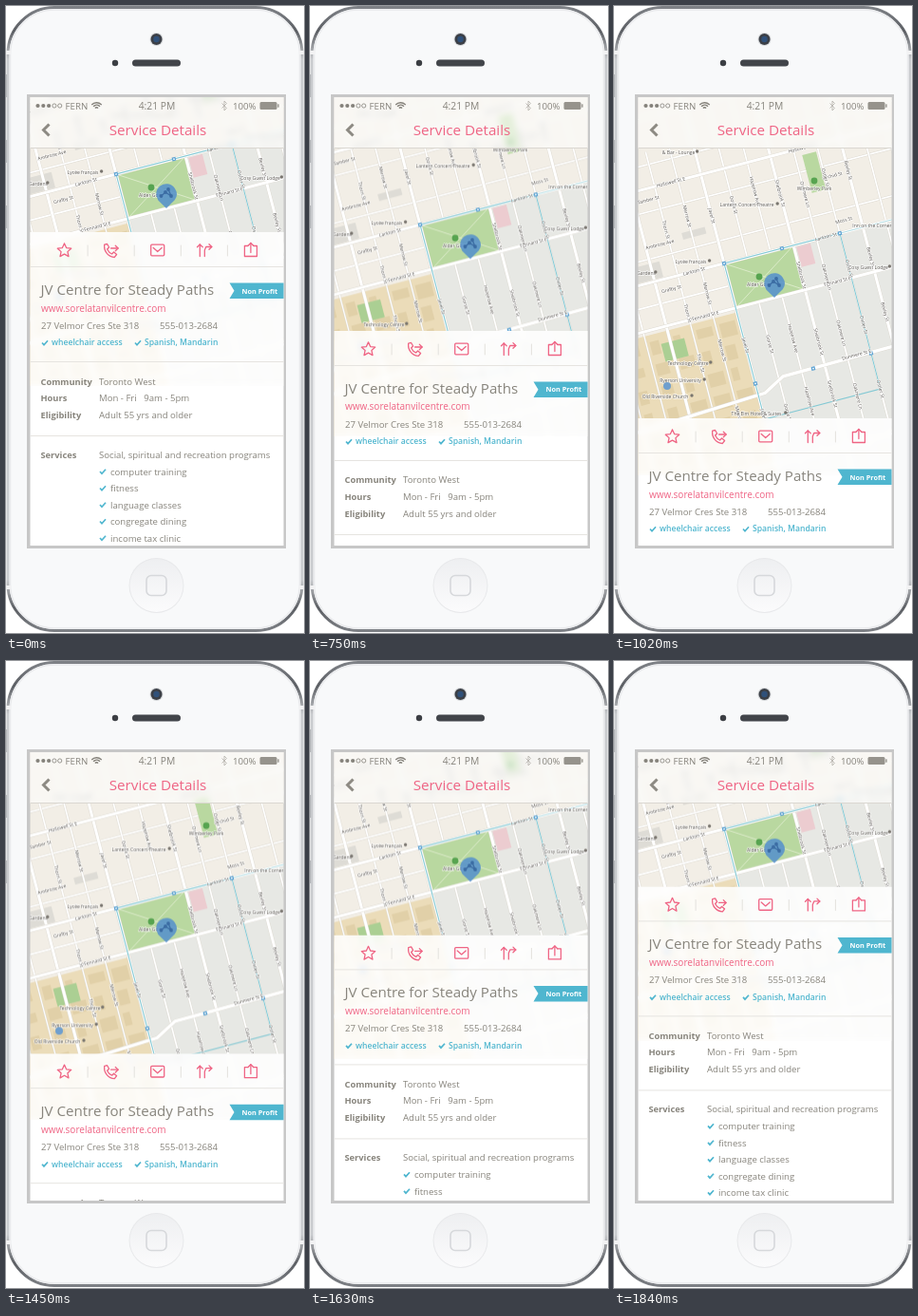
Recreate the animation shown at these times as an HTML page with a canvas. Size 314 by 660 pixels, loop 1.91 s.

```html
<!DOCTYPE html>
<html lang="en">
<head>
<meta charset="utf-8">
<title>Service details</title>
<style>
html, body { margin: 0; width: 100%; height: 100%; overflow: hidden; background: #fff; }
canvas { display: block; width: 314px; height: 660px; }
</style>
</head>
<body>
<canvas id="stage"></canvas>
<script>
const W = 314, H = 660, LOOP = 1910, STEP = 30, OPEN_AT = 630, CLOSE_AT = 1450;
const PINK = '#ef6484', BLUE = '#4fb6cf', GREY = '#87847c';
const FONT = '"Open Sans", "Noto Sans", sans-serif';
const PANEL_TRAVEL = 196, MAP_TRAVEL = 94, MAP_TOP = 60, MAP_H = 434;
const dpr = window.devicePixelRatio || 1;

function prepare(canvas, height) {
  canvas.width = W * dpr;
  canvas.height = height * dpr;
  const g = canvas.getContext('2d');
  g.scale(dpr, dpr);
  return g;
}

const ctx = prepare(document.getElementById('stage'), H);

function seeded(seed) {
  return () => (seed = seed * 16807 % 2147483647) / 2147483647;
}
function path(g, pts) {
  g.beginPath();
  pts.forEach(([x, y], i) => i ? g.lineTo(x, y) : g.moveTo(x, y));
}
function line(g, color, width, pts) {
  path(g, pts);
  g.strokeStyle = color;
  g.lineWidth = width;
  g.stroke();
}
function disc(g, color, x, y, r) {
  g.beginPath();
  g.arc(x, y, r, 0, Math.PI * 2);
  g.fillStyle = color;
  g.fill();
}
function pill(fill, x, y, w, h, r, stroke, width) {
  ctx.beginPath();
  ctx.roundRect(x, y, w, h, r);
  if (fill) {
    ctx.fillStyle = fill;
    ctx.fill();
  }
  if (stroke) {
    ctx.strokeStyle = stroke;
    ctx.lineWidth = width;
    ctx.stroke();
  }
}
function text(g, str, x, y, size, color, weight = 400, align = 'left') {
  g.font = `${weight} ${size}px ${FONT}`;
  g.textAlign = align;
  g.fillStyle = color;
  g.fillText(str, x, y);
}

// The town is a square grid of streets (u) and avenues (v), turned about one corner of the park.
const TILT = -0.255, CELL_U = 25.2, CELL_V = 24.2, CORNER = [116, 271];

function paintMap(g) {
  const random = seeded(11);
  const at = (u, v) => [u * CELL_U, v * CELL_V];
  const block = (color, u, v, w, h) => {
    g.fillStyle = color;
    g.fillRect(...at(u, v), w * CELL_U, h * CELL_V);
  };
  const road = (width, ...stops) => {
    const pts = stops.map(([u, v]) => at(u, v));
    line(g, '#dcd8cf', width + 0.8, pts);
    line(g, '#fff', width, pts);
  };
  const label = (str, x, y, angle = 0) => {
    g.save();
    g.translate(x, y);
    g.rotate(angle);
    g.lineJoin = 'round';
    g.font = `500 5px ${FONT}`;
    g.textAlign = 'center';
    g.strokeStyle = 'rgba(255,255,255,.8)';
    g.lineWidth = 1.4;
    g.strokeText(str, 0, 1.6);
    text(g, str, 0, 1.6, 5, '#57534e', 500, 'center');
    g.restore();
  };

  g.translate(0, -MAP_TOP);
  g.fillStyle = '#f2eee6';
  g.fillRect(0, MAP_TOP, W, MAP_H);

  g.save();
  g.translate(...CORNER);
  g.rotate(TILT);
  block('#e7e8e4', 0, 0, 9, 14);
  block('#dedcd6', -3.9, -0.8, 1.3, 0.7);
  block('#dedcd6', -1.4, -1.75, 1, 0.3);

  for (let k = -8; k <= 9; k++) {
    if (k % 3) road(1.7, [k, k < 0 ? -9 + random() * 4 : -9], [k, 12]);
    if (k % 2) road(1.7, [-8, k], [k > 0 ? 0 : 10, k]);
  }
  block('#ebdcb9', -6, 2.2, 6, 9);
  for (let u = -5; u < 0; u++) {
    for (let v = 2.5; v < 8; v++) block('#e1d0a8', u + 0.15, v, 0.3 + random() * 0.4, 0.3 + random() * 0.4);
    road(1.2, [u, 2.2], [u, 11]);
  }
  block('#abcf93', -3.4, 2.7, 1, 0.8);
  block('#b9d8a0', 4.3, -3.7, 0.6, 1.7);
  block('#b9d8a0', 0, 0, 3, 2);
  line(g, '#dcebca', 0.9, [at(0, 0), at(3, 2)]);
  line(g, '#dcebca', 0.9, [at(0, 2), at(3, 0)]);
  block('#ecccd0', 3.1, 0.1, 0.6, 0.9);

  for (let k = -6; k <= 9; k += 3) road(3, [k, -9], [k, 12]);
  for (const v of [-8, -4, 0, 2, 9]) road(3, [-8, v], [10, v]);
  road(3.4, [-6, 6.2], [0.3, 5.9], [1.2, 5.4], [10, 5.3]);
  line(g, '#84c9d4', 1.1, [[0, 7], [0, 0], [5, 0], [5, 7], [0, 7]].map(p => at(...p)));
  line(g, '#a8d8df', 0.8, [at(5, 0), at(9, 0)]);

  for (let u = 0; u <= 7.5; u += 2.5) for (const v of [0, 5.4]) {
    const [x, y] = at(u, v);
    g.fillStyle = '#5fa3d2';
    g.fillRect(x - 2, y - 2, 4, 4);
    disc(g, '#fff', x, y, 0.9);
  }

  ['Hollowell St E', 'Larkton St', 'Fennard St E', 'Dunmere St E'].forEach((name, i) => {
    const v = [-4, 0, 2, 5.3][i];
    for (const u of [-1.3, 4.4]) if (v < 5 || u > 0) label(name, ...at(u, v));
  });
  ['Tamber St', 'Orchid St', 'Ambrose Ave', 'Moss St', 'Grafby St'].forEach((name, i) => {
    label(name, ...at(i % 2 ? 5.3 : -2.4, i - 3.5));
  });
  ['Thorn St', 'Merrow St', 'Javel St', 'Gorse St', 'Hazelrow Ave', 'Shelbrook St', 'Oakmere Ln', 'Ostler St', 'Bexley St']
    .forEach((name, i) => {
      for (const v of [-2.8, 0.9, 3.6, 6.6]) {
        const u = i - 2;
        if (v !== 0.9 || u < 0 || u > 2) label(name, ...at(u, v + random() * 0.8), Math.PI / 2);
      }
    });
  g.restore();

  const sights = [
    ['& Bar - Lounge', 68, 154], ['Wimberley Park', 211, 192], ['Lantern Concert Theatre', 140, 209],
    ['Inn on the Corner', 272, 231], ['Lycée français', 81, 269], ['Gardens', 34, 281],
    ['Alder Gdns', 153, 293], ['Cosy Guest Lodge', 268, 275], ['Technology Centre', 78, 376],
    ['Ryerson University', 70, 394], ['Old Riverside Church', 54, 411], ['The Elm Hotel & Suites', 150, 429]
  ];
  for (const [name, x, y] of sights) {
    label(name, x, y);
    const green = /Park|Gdns/.test(name);
    disc(g, green ? '#57a450' : '#7a7670', x + (green ? 0 : name.length * 1.4), y - (green ? 8 : 1), green ? 3.4 : 1.7);
  }
  disc(g, '#6f9fce', 56, 400, 4);

  g.beginPath();
  g.arc(169, 292, 10.8, Math.PI * 0.8, Math.PI * 2.2);
  g.quadraticCurveTo(174, 302, 169, 307);
  g.quadraticCurveTo(164, 302, 160.3, 298.4);
  g.fillStyle = 'rgba(84,143,204,.86)';
  g.fill();
  const beads = [[163.5, 294], [168, 290], [174, 294], [171, 287]];
  line(g, '#3b6ca3', 1.3, beads);
  for (const [x, y] of beads) disc(g, '#3b6ca3', x, y, 1.9);
}

const mapCanvas = document.createElement('canvas');
paintMap(prepare(mapCanvas, MAP_H));
const mistCanvas = document.createElement('canvas');
const mist = prepare(mistCanvas, MAP_H);
mist.filter = `blur(${3 * dpr}px)`;
mist.drawImage(mapCanvas, 0, 0, W, MAP_H);

// A steady run up to the ninth step, then a soft settle on the end value.
function glide(n, end, knee, slope) {
  if (n >= end) return 1;
  if (n <= 9) return n / 9 * knee;
  const span = end - 9, u = (n - 9) / span;
  return knee + (1 - knee) * u * u * (3 - 2 * u) + slope * span * u * (1 - u) ** 2;
}

function pose(t) {
  const closing = t >= CLOSE_AT;
  const start = closing ? CLOSE_AT : OPEN_AT;
  const n = t < start ? 0 : Math.floor((t - start) / STEP) + 1;
  const end = closing ? 15 : 14;
  const open = p => closing ? 1 - p : p;
  return {
    panel: PANEL_TRAVEL * open(glide(n, end, 0.955, 0.045)),
    map: MAP_TRAVEL * open(glide(n, end, 1.02, 0.01))
  };
}

function phoneBody() {
  ctx.fillStyle = '#fff';
  ctx.fillRect(0, 0, W, H);
  ctx.fillStyle = '#a5a8ab';
  for (const y of [72, 141, 210]) ctx.fillRect(0, y, 3, 24);
  ctx.fillRect(213, 0, 50, 3);

  const rim = ctx.createLinearGradient(0, 0, 0, H);
  for (const end of [0, 1]) {
    rim.addColorStop(end, '#808388');
    rim.addColorStop(Math.abs(end - 0.04), '#5c5f64');
    rim.addColorStop(Math.abs(end - 0.085), '#c9cbce');
  }
  pill('#f8f9fa', 2, 1.5, 310, 656, 49, rim, 3);
  pill(null, 4.5, 4, 305, 651, 46.5, '#eaebed', 1.6);
  ctx.fillStyle = '#f2f2f3';
  for (const y of [47, 610]) for (const x of [0, 309]) ctx.fillRect(x, y, 5, 4);

  disc(ctx, '#d5d7d9', 158.5, 35, 7);
  disc(ctx, '#3c4047', 158.5, 35, 6);
  disc(ctx, '#30517a', 158.5, 35, 3.2);
  disc(ctx, '#3b3e43', 115, 60, 3.2);
  pill('#42454a', 133, 56.5, 51, 7, 3.5);

  const dish = ctx.createLinearGradient(0, 582, 0, 638);
  dish.addColorStop(0, '#eeeff1');
  dish.addColorStop(1, '#fbfbfc');
  disc(ctx, '#e8e9eb', 158.5, 610, 29);
  disc(ctx, dish, 158.5, 610, 28);
  pill(null, 148, 599.5, 21, 21, 5, '#d6d8db', 1.6);

  ctx.fillStyle = '#c7c7c7';
  ctx.fillRect(22, 93, 273, 478);
}

function check(x, y) {
  line(ctx, BLUE, 1.7, [[x - 3, y], [x - 1, y + 2.2], [x + 3, y - 2.2]]);
}

function icons(y) {
  ctx.save();
  ctx.lineJoin = ctx.lineCap = 'round';
  const place = i => ctx.setTransform(dpr, 0, 0, dpr, (61.5 + 49.1 * i) * dpr, y * dpr);
  const stroke = (...pts) => line(ctx, PINK, 1.3, pts);
  // An arrow head with its tip at (x, y), pointing along the given angle.
  const head = (x, y, angle) => stroke(...[-1, 0, 1].map(s => {
    const a = angle + Math.PI + s * Math.PI / 4, r = s ? 4 : 0;
    return [x + r * Math.cos(a), y + r * Math.sin(a)];
  }));
  const drawings = [
    () => stroke(...Array.from({ length: 11 }, (_, i) => {
      const a = -Math.PI / 2 + i * Math.PI / 5, r = i % 2 ? 3.6 : 7.6;
      return [r * Math.cos(a), 0.5 + r * Math.sin(a)];
    })),
    () => {
      ctx.beginPath();
      ctx.arc(4.5, -4, 11.5, Math.PI * 0.52, Math.PI * 1.05);
      ctx.lineTo(-4, -6.5);
      ctx.lineTo(-2, -3);
      ctx.lineTo(-4, -1);
      ctx.quadraticCurveTo(-2, 3, 1, 4);
      ctx.lineTo(3, 2);
      ctx.lineTo(6, 4.5);
      ctx.closePath();
      ctx.stroke();
      stroke([0, -2], [7.5, -2]);
      head(7.5, -2, 0);
    },
    () => {
      pill(null, -7, -5.8, 14, 11.6, 1, PINK, 1.3);
      stroke([-4.5, -2.5], [0, 1.5], [4.5, -2.5]);
    },
    () => {
      stroke([-4.5, 6.5], [-4.5, -6]);
      head(-4.5, -6, -Math.PI / 2);
      stroke([0.5, 6.5], [0.5, 0], [2, -3.5], [8, -3.5]);
      head(8, -3.5, 0);
    },
    () => {
      stroke([-3, -4.5], [-6.5, -4.5], [-6.5, 6.5], [6.5, 6.5], [6.5, -4.5], [3, -4.5]);
      stroke([0, 2.5], [0, -7.5]);
      head(0, -7.5, -Math.PI / 2);
    }
  ];
  drawings.forEach((drawing, i) => {
    place(i);
    if (i) line(ctx, '#e3e1dd', 1, [[-24.5, -5], [-24.5, 6]]);
    ctx.strokeStyle = PINK;
    ctx.lineWidth = 1.3;
    drawing();
  });
  ctx.restore();
}

function panel(offset, mapY) {
  ctx.save();
  ctx.translate(0, offset);
  ctx.beginPath();
  ctx.rect(25, 238, 268, 480);
  ctx.clip();
  ctx.fillStyle = '#fff';
  ctx.fill();
  ctx.globalAlpha = 0.14;
  ctx.drawImage(mistCanvas, 0, mapY - offset, W, MAP_H);
  ctx.globalAlpha = 1;

  icons(257 + offset);
  for (const y of [274.5, 374.5, 452.5]) line(ctx, '#e6e4e0', 1, [[25, y], [293, y]]);

  text(ctx, 'JV Centre for Steady Paths', 36.5, 304, 15.1, GREY, 500);
  path(ctx, [[235.5, 291.5], [293, 291.5], [293, 308], [235.5, 308], [240.5, 299.7]]);
  ctx.fillStyle = BLUE;
  ctx.fill();
  text(ctx, 'Non Profit', 248.5, 302.5, 7.3, '#fff', 700);
  text(ctx, 'www.sorelatanvilcentre.com', 37, 321.5, 10, PINK);
  text(ctx, '27 Velmor Cres Ste 318', 37, 340, 9.6, GREY);
  text(ctx, '555-013-2684', 162, 340, 9.6, GREY);
  ['wheelchair access', 'Spanish, Mandarin'].forEach((tag, i) => {
    check(41 + 98 * i, 354.5);
    text(ctx, tag, 48 + 98 * i, 357.3, 8.6, BLUE, 600);
  });

  const row = (label, value, y) => {
    text(ctx, label, 36.5, y, 9.3, GREY, 700);
    text(ctx, value, 98, y, 9.6, GREY);
  };
  row('Community', 'Toronto West', 398.5);
  row('Hours', 'Mon - Fri   9am - 5pm', 416);
  row('Eligibility', 'Adult 55 yrs and older', 434);
  row('Services', 'Social, spiritual and recreation programs', 476);
  ['computer training', 'fitness', 'language classes', 'congregate dining', 'income tax clinic'].forEach((item, i) => {
    const y = 490 + 17.5 * i;
    check(102, y);
    text(ctx, item, 110, y + 3.6, 9.6, GREY);
  });
  ctx.restore();
}

function header(mapY) {
  const tone = '#85827b';
  ctx.save();
  ctx.beginPath();
  ctx.rect(25, 96, 268, 54);
  ctx.clip();
  ctx.fillStyle = '#fcfcfa';
  ctx.fill();
  ctx.globalAlpha = 0.35;
  ctx.drawImage(mistCanvas, 0, mapY, W, MAP_H);
  ctx.restore();
  line(ctx, '#dad7d1', 1, [[25, 149.5], [293, 149.5]]);

  for (let i = 0; i < 5; i++) {
    ctx.beginPath();
    ctx.arc(33.5 + i * 5.8, 105, 2.1, 0, Math.PI * 2);
    ctx.fillStyle = ctx.strokeStyle = tone;
    ctx.lineWidth = 0.8;
    i < 3 ? ctx.fill() : ctx.stroke();
  }
  text(ctx, 'FERN', 62.5, 108.6, 9.7, tone);
  for (let r = 2.2; r < 8; r += 2.5) {
    ctx.beginPath();
    ctx.arc(95.5, 109, r, -Math.PI * 0.76, -Math.PI * 0.24);
    ctx.strokeStyle = tone;
    ctx.lineWidth = 1.4;
    ctx.stroke();
  }
  text(ctx, '4:21 PM', 159, 108.7, 10.3, tone, 500, 'center');
  line(ctx, '#b9b6b0', 0.9, [[227.5, 102.5], [232.5, 107.5], [230, 110], [230, 100], [232.5, 102.5], [227.5, 107.5]]);
  text(ctx, '100%', 239, 108.6, 9.7, tone);
  pill('#96938c', 267.5, 101, 18, 8, 1.5);
  ctx.fillRect(286.2, 103.3, 1.4, 3.4);

  line(ctx, '#8d8a83', 3, [[45.5, 124.5], [39.5, 130.5], [45.5, 136.5]]);
  text(ctx, 'Service Details', 160, 135.6, 15.2, PINK, 500, 'center');
}

function draw(now) {
  const { panel: offset, map } = pose(now % LOOP);
  const mapY = MAP_TOP + map - MAP_TRAVEL;
  phoneBody();
  ctx.save();
  ctx.beginPath();
  ctx.rect(25.5, 96, 267, 472);
  ctx.clip();
  ctx.drawImage(mapCanvas, 0, mapY, W, MAP_H);
  panel(offset, mapY);
  header(mapY);
  ctx.restore();
}

let origin;
function tick(now) {
  origin ??= now;
  draw(now - origin);
  requestAnimationFrame(tick);
}
draw(0);
requestAnimationFrame(tick);
</script>
</body>
</html>
```
